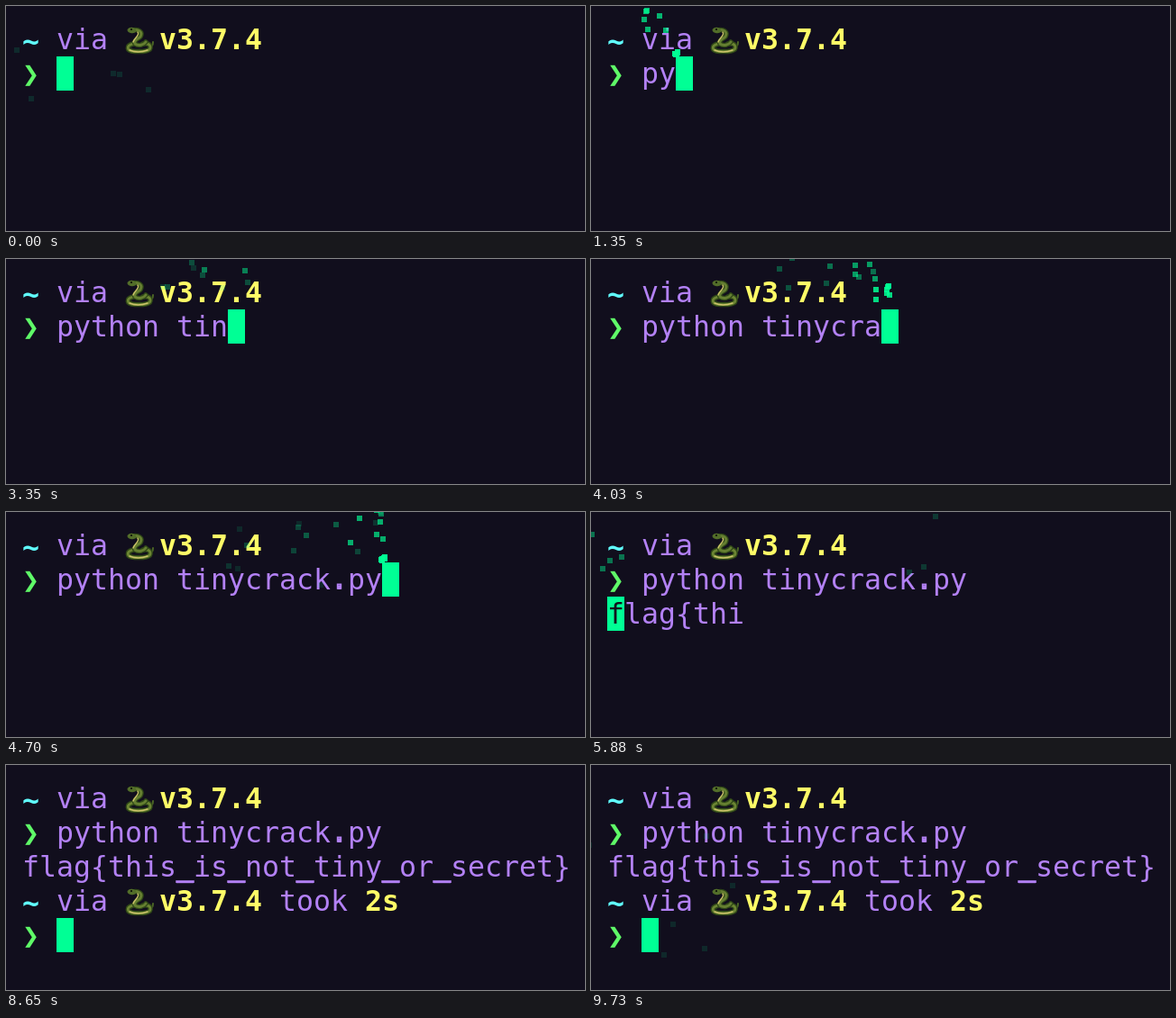
An HTML page with a canvas for the animation above (9760 ms loop, 642 by 250 pixels).

```html
<!DOCTYPE html>
<html lang="en">
<head>
<meta charset="utf-8">
<title>Terminal session</title>
<style>
html, body { margin: 0; width: 100%; height: 100%; overflow: hidden; background: #110e1d; }
canvas { display: block; width: 642px; height: 250px; }
</style>
</head>
<body>
<canvas id="stage" width="642" height="250"></canvas>
<script>
const ctx = document.getElementById('stage').getContext('2d');
const LOOP = 9760, STEP = 50, FRAME = 1000 / 60;
const CELL = 19, ROW = 38, PAD = 18;
const FONT = '31.56px "DejaVu Sans Mono", "DejaVu Sans", monospace';
const BG = '#110e1d', PURPLE = '#b381f5', YELLOW = '#fffc67';
const CYAN = '#60fdff', GREEN = '#5ffa68', CURSOR = '#00ff95';
const GRAVITY = 0.15, FADE = 0.96;

const OUTPUT = 'flag{this_is_not_tiny_or_secret}';
const RUN = 5500, PRINT = 5808, NEWLINE = 8220, PROMPT = 8650;

// Typed pieces, each at its own steady pace
const pieces = [
  { str: 'python', from: 1200, pace: 136 },
  { str: ' tin', from: 2333, pace: 236 },
  { str: 'ycrack.py', from: 3483, pace: 150 }
];
const keys = pieces.flatMap(p => [...p.str].map((ch, i) => ({ ch, t: p.from + i * p.pace })));

const colX = c => PAD + c * CELL;
const rowY = r => PAD + r * ROW;

// Small seeded generator so that every loop looks the same
let seed = 41;
const rand = (lo, hi) => {
  seed = (seed * 16807) % 2147483647;
  return lo + (hi - lo) * seed / 2147483647;
};

// Every cursor move throws a handful of sparks upwards
const sparks = [];
function burst(t, col, row) {
  const count = Math.round(rand(5, 8));
  for (let i = 0; i < count; i++) {
    sparks.push({ t, x: colX(col), y: rowY(row), vx: rand(-2.2, 2), vy: rand(-7, -3) });
  }
}
burst(-880, 2, 1);
keys.forEach((k, i) => burst(k.t, i + 3, 1));
burst(RUN - 370, 21, 1);
burst(RUN, 0, 2);
burst(PROMPT + 130, 2, 4);

function text(str, col, row, color, bold, drop = 0) {
  ctx.font = (bold ? 'bold ' : '') + FONT;
  ctx.fillStyle = ctx.strokeStyle = color;
  ctx.lineWidth = 1.5;
  [...str].forEach((ch, i) => {
    const x = colX(col + i), y = rowY(row) + 30 + drop;
    ctx.fillText(ch, x, y);
    // low punctuation is heavier than the letters
    if (!bold && '._'.includes(ch)) ctx.strokeText(ch, x, y - 0.7);
  });
}

function curve(color, width, path) {
  ctx.strokeStyle = color;
  ctx.lineWidth = width;
  ctx.stroke(new Path2D(path));
}

function snake(row) {
  ctx.save();
  ctx.translate(132, rowY(row) + 4);
  ctx.lineCap = ctx.lineJoin = 'round';
  const coil = 'M9 20C1 22 1 28 11 28.5C21 29 29 28 28 23Q27 19 20 20';
  const neck = 'M8 5C15 3 20 7 17 12C14 15 9 16 11 20C15 23 21 21 23 18';
  curve('#4b6526', 2, 'M27 24Q31 23 31 18');
  curve('#2f4718', 5.5, coil);
  curve('#6c8533', 2.8, coil);
  curve('#cbc26a', 1.4, 'M5 27Q14 31 25 27');
  curve('#2f4718', 5.5, neck);
  curve('#657f31', 3, neck);
  curve('#cbc26a', 1.4, 'M14 7C17 10 10 14 9 18');
  ctx.fillStyle = '#526d29';
  ctx.beginPath();
  ctx.ellipse(7.5, 5, 5, 3.2, 0.1, 0, Math.PI * 2);
  ctx.fill();
  ctx.fillStyle = '#161d0c';
  ctx.fillRect(6, 3, 2, 2);
  ctx.restore();
}

function prompt(row) {
  text('~', 0, row, CYAN, true, 1.5);
  text('via', 2, row, PURPLE);
  snake(row);
  text('v3.7.4', 8, row, YELLOW, true);
  text('❯', 0, row + 1, GREEN, true);
}

// The known prefix comes at once, then one found character after another
function printed(t) {
  if (t < RUN + 50) return '';
  const n = 8 + Math.floor((t - PRINT) / 94);
  return OUTPUT.slice(0, Math.max(5, n));
}

function cursorAt(t, typed) {
  if (t < RUN) return [2 + typed, 1];
  if (t < NEWLINE) return [0, 2];
  return t < PROMPT ? [0, 3] : [2, 4];
}

function drawSparks(t) {
  ctx.fillStyle = CURSOR;
  for (const s of sparks) {
    const n = (t - s.t) / FRAME;
    const alpha = n > 0 ? FADE ** n : 0;
    if (alpha <= 0.1) continue;
    ctx.globalAlpha = alpha;
    const x = s.x + s.vx * n, y = s.y + s.vy * n + GRAVITY * n * n / 2;
    ctx.fillRect(Math.round(x) - 2, Math.round(y) - 2, 6, 6);
  }
  ctx.globalAlpha = 1;
}

function draw(t) {
  ctx.fillStyle = BG;
  ctx.fillRect(0, 0, 642, 250);

  const typed = keys.filter(k => k.t <= t).map(k => k.ch).join('');
  const out = printed(t);
  prompt(0);
  text(typed, 2, 1, PURPLE);
  text(out, 0, 2, PURPLE);
  if (t >= PROMPT) {
    prompt(3);
    text('took', 15, 3, PURPLE);
    text('2s', 20, 3, YELLOW, true);
  }

  const [col, row] = cursorAt(t, typed.length);
  ctx.fillStyle = CURSOR;
  ctx.fillRect(colX(col), rowY(row), CELL, ROW);
  if (row === 2) text(out.slice(0, 1), 0, 2, BG);
  drawSparks(t);
}

const start = performance.now();
function tick() {
  let t = Math.floor(((performance.now() - start) % LOOP) / STEP) * STEP;
  if (t > 5550 && t < 5750) t = 5550; // brief stall while the script starts
  draw(t);
  requestAnimationFrame(tick);
}
tick();
</script>
</body>
</html>
```
